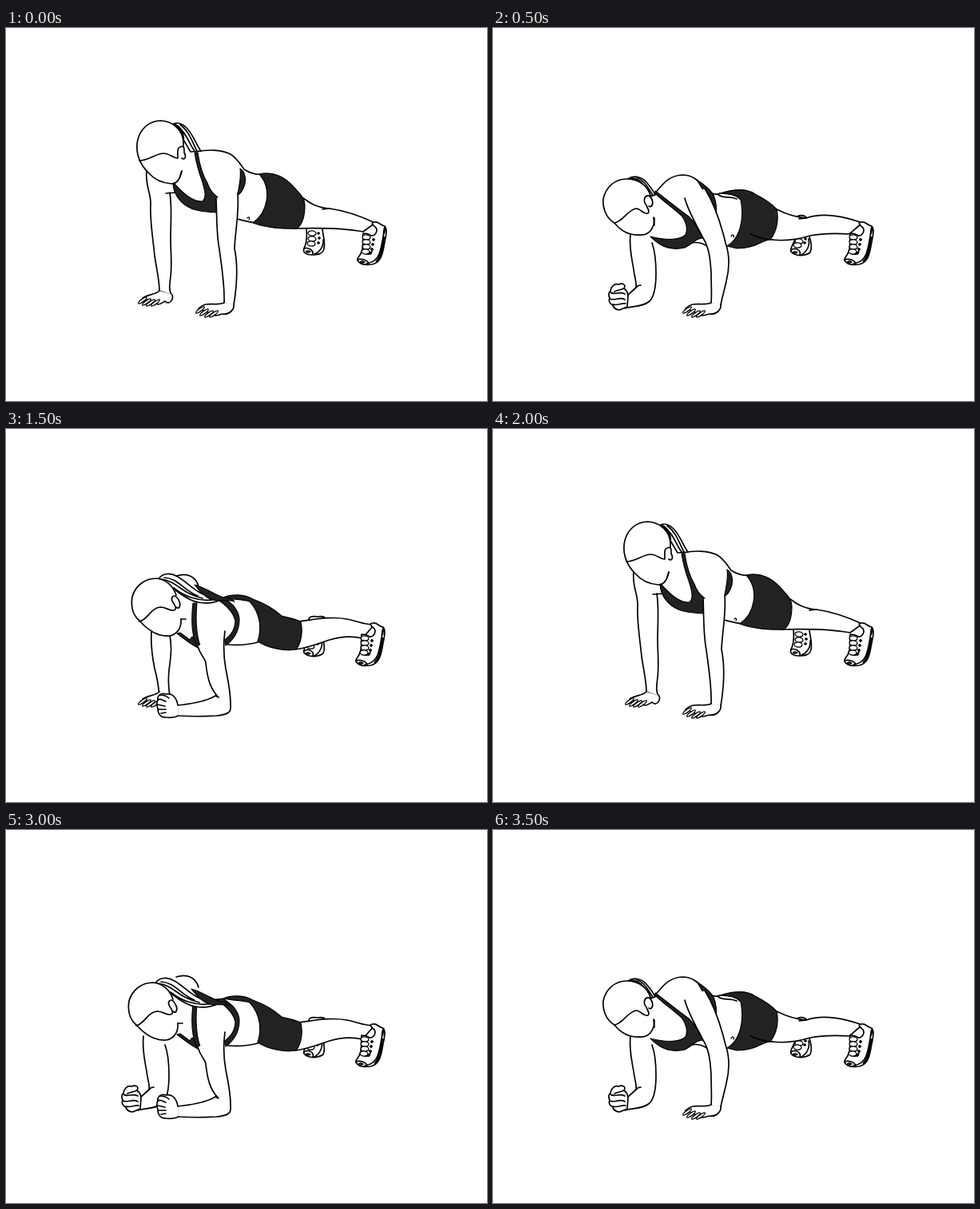
Animation, 602 px wide and 467 px high, one loop 4000 ms. Source, as an HTML page:

```html
<!DOCTYPE html>
<html lang="en">
<head>
<meta charset="utf-8">
<title>Up-down plank</title>
<style>
html, body { margin: 0; width: 100%; height: 100%; overflow: hidden; background: #fff; }
svg { display: block; width: 100%; height: 100%; }
path, ellipse, circle { fill: none; stroke: #000; stroke-width: 1.7; stroke-linecap: round; stroke-linejoin: round; }
.skin { fill: #fff; }
.bare { fill: #fff; stroke: none; }
.cloth { fill: #222; stroke-width: 1.2; }
.dot { fill: #222; stroke-width: 1; }
.thin { stroke-width: 1.3; }
.thick { stroke-width: 2.6; }
.pose { visibility: hidden; animation: 4s step-end infinite; }
#high { animation-name: high; }
#left { animation-name: left; }
#low { animation-name: low; }
#right { animation-name: right; }
@keyframes high { 0%, 50% { visibility: visible; } 12.5%, 62.5%, 100% { visibility: hidden; } }
@keyframes left { 0%, 25% { visibility: hidden; } 12.5%, 87.5%, 100% { visibility: visible; } }
@keyframes low { 0%, 37.5%, 87.5%, 100% { visibility: hidden; } 25%, 75% { visibility: visible; } }
@keyframes right { 0%, 50%, 75%, 100% { visibility: hidden; } 37.5%, 62.5% { visibility: visible; } }
</style>
</head>
<body>
<svg viewBox="0 0 602 467">
<defs>
  <ellipse id="finger" class="skin thin" rx="6.5" ry="1.7" transform="rotate(-36)"/>
  <ellipse id="lace" class="skin thin" rx="5" ry="3.1" transform="rotate(8)"/>

  <g id="shoe">
    <path class="skin" d="M447 257C446 266 448 273 445 280C444 285 439 287 440 291C443 296 451 297 458 296C468 294 471 285 473 273C475 262 478 252 474 248C468 247 467 242 461 243C456 243 459 247 463 250C466 255 461 261 457 260C453 257 450 257 447 257"/>
    <path d="M474 249C472 260 471 272 467 283C464 291 458 294 451 295"/>
    <path class="thick" d="M474 251L473 257M473 262C471 274 470 286 464 292"/>
    <path d="M440 290C445 288 453 291 454 295M446 281C453 285 457 283 458 279"/>
    <use href="#lace" x="451" y="262"/>
    <use href="#lace" x="451" y="268"/>
    <use href="#lace" x="451" y="274"/>
    <use href="#lace" x="450" y="280"/>
    <circle class="dot" cx="460" cy="265" r="1.4"/>
    <circle class="dot" cx="459" cy="271" r="1.4"/>
    <circle class="dot" cx="458" cy="277" r="1.4"/>
    <circle class="dot" cx="456" cy="282" r="1.4"/>
    <ellipse class="dot" cx="446" cy="293" rx="3" ry="1.2"/>
  </g>
  <g id="backShoe">
    <path class="skin" d="M379 262C377 270 371 275 373 280C378 286 390 286 397 281C400 274 398 267 396 261"/>
    <path d="M373 278C379 274 386 279 384 284M395 264C397 272 393 280 386 284"/>
    <use href="#lace" x="383" y="267"/>
    <use href="#lace" x="381" y="272"/>
    <circle class="dot" cx="391" cy="264" r="1.3"/>
    <circle class="dot" cx="390" cy="269" r="1.3"/>
    <ellipse class="dot" cx="378" cy="281" rx="3" ry="1.2"/>
  </g>
  <g id="farHand">
    <path class="skin" d="M192 329C187 334 179 333 171 338L190 346C194 346 197 343 199 342C204 347 210 341 208 334"/>
    <use href="#finger" x="171" y="341"/>
    <use href="#finger" x="176" y="343"/>
    <use href="#finger" x="181" y="344"/>
    <use href="#finger" x="187" y="344"/>
  </g>
  <g id="nearHand">
    <path class="skin" d="M273 344C267 347 258 345 250 346C246 347 243 349 241 351L262 360C266 360 268 358 272 358C279 359 286 353 285 346"/>
    <use href="#finger" x="243" y="353"/>
    <use href="#finger" x="248" y="356"/>
    <use href="#finger" x="254" y="358"/>
    <use href="#finger" x="260" y="358"/>
  </g>

  <!-- far arm resting on the elbow -->
  <g id="farForearm">
    <path class="skin" d="M172 258C170 275 174 290 176 302C177 312 180 318 179 325L168 335L165 351C176 348 188 349 196 342C202 336 204 323 204 307C204 292 203 280 199 269"/>
    <path d="M179 325C181 322 183 322 185 322"/>
    <path class="skin" d="M157 321C152 319 148 324 147 329C144 332 145 336 146 338C144 342 147 346 150 347C151 352 157 354 161 352L168 349L169 336C169 332 168 329 164 326C167 321 162 319 157 321"/>
    <path d="M164 326C160 328 156 328 152 330M147 331C152 335 158 329 165 333M146 339C152 342 159 336 165 340M150 346C156 348 160 344 166 345"/>
  </g>

  <!-- near arm resting on the elbow -->
  <g id="nearForearm">
    <path class="skin" d="M240 272C244 285 250 288 250 293C252 311 255 325 266 336L262 334C251 341 234 344 214 346L215 359C232 360 247 360 263 359C274 358 281 356 281 350C282 333 278 315 275 300C272 283 272 268 274 253"/>
    <path class="skin" d="M215 346C214 338 209 330 200 332C194 330 189 334 190 339C188 343 189 347 190 350C190 357 194 361 200 361C207 362 212 361 216 359"/>
    <path d="M192 333C196 333 201 334 204 337M190 339C194 337 197 340 200 341M190 345L199 347M191 351L200 351M194 356L200 355"/>
  </g>

  <!-- head, ponytail and shoulder strap of the elbow poses -->
  <g id="elbowHead">
    <path class="skin" d="M191 188C195 180 207 180 213 184C224 189 232 200 245 206C255 211 264 212 272 212C264 217 252 219 241 217C228 215 220 207 212 202"/>
    <path d="M198 186C216 187 222 202 240 209M194 188C214 190 219 206 246 212M210 199C222 209 240 216 258 214"/>
    <path class="cloth" d="M236 195C248 198 259 206 272 211C279 211 284 213 286 216C277 213 268 216 258 214C249 211 242 203 236 195"/>
    <path class="skin" d="M219 238C220 250 213 258 204 259C189 260 177 251 168 241C158 233 156 222 158 210C162 196 174 187 188 187C200 188 209 196 213 208"/>
    <path class="skin" d="M167 241C177 239 181 224 193 223C201 223 204 228 210 227C215 226 211 220 209 217C205 211 210 207 213 210C217 214 219 220 217 223C216 225 214 224 213 223"/>
    <path d="M219 238L225 238"/>
  </g>

  <g id="elbowBody">
    <path class="skin" d="M380 242C377 235 382 234 390 235C396 234 400 235 400 239"/>
    <use href="#backShoe"/>
    <path class="skin" d="M365 241C384 239 405 234 427 238C441 241 448 245 461 245L446 262C433 259 418 260 405 264C389 269 378 274 362 276"/>
    <use href="#shoe" x="-2"/>
    <path class="bare" d="M213 184C228 179 238 186 241 197L274 211C290 209 303 214 309 218L317 268C304 271 290 271 278 270L240 272L215 257L225 205"/>
    <path d="M213 184C228 179 238 186 241 197"/>
    <path class="cloth" d="M272 211C283 206 299 207 309 213C323 218 335 225 345 234C355 237 366 238 369 242C372 254 369 269 363 276C346 279 326 273 315 266C320 251 319 231 305 216C296 213 285 214 272 211"/>
    <path class="cloth" d="M214 256C223 263 231 269 240 274L238 264L233 260L230 264L218 255Z"/>
    <path class="cloth" d="M234 218L239 218C237 236 238 258 243 271L239 271C232 258 232 236 234 218"/>
    <path class="cloth" d="M262 212L271 211C280 216 291 225 292 238C292 252 286 263 275 271L274 264C282 258 287 250 287 240C284 228 274 219 262 212"/>
    <path d="M278 270C290 271 304 270 315 267"/>
  </g>
</defs>

<g id="high" class="pose">
  <path class="skin" d="M376 252C377 262 376 270 373 276C371 281 376 284 382 284C390 284 397 283 398 276C400 266 396 258 396 251"/>
  <path d="M373 276C379 274 385 279 384 283M397 265C398 274 392 281 386 283"/>
  <use href="#lace" x="383" y="257"/>
  <use href="#lace" x="383" y="264"/>
  <use href="#lace" x="382" y="270"/>
  <circle class="dot" cx="391" cy="257" r="1.3"/>
  <circle class="dot" cx="392" cy="263" r="1.3"/>
  <circle class="dot" cx="391" cy="269" r="1.3"/>
  <ellipse class="dot" cx="378" cy="280" rx="3" ry="1.2"/>
  <path class="skin" d="M372 213C381 220 390 225 405 226C426 229 445 236 462 244L447 255C425 251 392 250 360 251"/>
  <path d="M405 226L396 227"/>
  <use href="#shoe"/>

  <path class="skin" d="M176 179C174 198 182 207 181 222C180 241 184 264 186 285C189 305 192 316 192 329L208 335C203 329 205 320 206 311C208 295 206 280 206 263C206 244 208 225 205 206"/>
  <use href="#farHand"/>
  <path d="M200 207L213 206"/>
  <path class="bare" d="M208 185L238 155C285 148 295 165 298 177L320 183L334 220L312 244L290 240L250 230L211 206Z"/>
  <path d="M238 155C252 152 269 152 281 158C289 163 293 170 298 177C306 182 314 184 321 183M289 239C297 241 304 243 313 244"/>
  <path class="cloth" d="M317 183C335 179 350 187 360 199C368 208 374 213 374 222C374 235 371 246 364 251C347 252 325 250 309 244C327 231 334 202 317 183"/>
  <path class="thin" d="M302 238C303 236 306 237 304 240"/>
  <path class="cloth" d="M236 156L240 156C242 170 246 184 252 194C255 203 259 207 265 212L264 231C249 230 231 230 219 217C212 210 209 202 209 193C219 204 232 218 246 217C252 211 248 200 245 190C241 180 238 168 236 156"/>
  <path class="cloth" d="M293 176C298 179 301 187 299 195C297 202 294 207 290 209C291 200 295 187 293 176"/>
  <path class="skin" d="M263 213C264 235 263 256 267 277C270 300 274 322 273 345L285 347C289 323 291 300 286 276C287 252 292 232 290 207"/>
  <use href="#nearHand"/>
  <path class="skin" d="M208 121C214 117 221 120 226 125C234 133 238 146 244 154L231 155L221 138"/>
  <path d="M218 121C230 130 234 145 239 154M215 123C226 131 229 145 236 154"/>
  <path class="thick" d="M211 121C217 123 222 131 222 138"/>
  <path class="skin" d="M220 179C218 189 214 195 207 195C194 194 184 188 178 181C167 170 163 158 164 145C166 127 179 116 194 116C208 117 221 126 222 143L222 149"/>
  <path class="skin" d="M167 166C178 166 188 157 197 157C205 157 209 163 215 163C215 155 214 150 218 149C224 146 223 153 223 156C226 161 224 166 220 163"/>
  <path d="M220 179L218 185"/>
</g>

<g id="left" class="pose">
  <path class="skin" d="M379 238C382 233 390 234 393 238"/>
  <use href="#backShoe"/>
  <path class="skin" d="M355 227C367 233 379 237 392 238C414 230 443 237 462 244L446 258C429 257 413 257 397 260C381 265 365 267 348 265"/>
  <path d="M392 238L383 239"/>
  <use href="#shoe"/>
  <use href="#farForearm"/>
  <path class="bare" d="M199 250L204 206C220 180 243 180 258 192L283 208L308 208L314 250L294 274L271 275L248 270L210 272Z"/>
  <path d="M203 206C211 199 217 185 237 184C252 184 258 193 266 201C272 207 278 210 284 207M282 209C290 214 296 210 305 214M248 269C259 267 267 272 271 276"/>
  <path class="cloth" d="M284 207C300 202 317 200 328 208C338 213 349 220 355 227C358 240 355 255 347 265C335 266 329 276 305 276L293 273C309 264 315 239 310 215C302 207 293 208 284 207"/>
  <path d="M322 258C331 262 340 265 350 265"/>
  <path class="thin" d="M298 261C299 258 303 259 301 262"/>
  <path class="cloth" d="M203 204C218 215 232 227 245 236C253 244 258 252 264 263C253 263 249 271 240 275C220 280 207 271 197 261C212 265 232 267 241 259C244 251 242 243 236 235C225 225 212 216 203 207Z"/>
  <path class="cloth" d="M255 190C264 196 275 204 277 212C280 220 280 229 279 238C274 222 264 204 255 190"/>
  <path class="skin" d="M240 213C244 229 256 249 263 263C271 276 272 291 273 306C273 321 274 333 273 345L285 347C287 336 290 327 292 317C296 301 297 286 291 269C285 244 277 220 265 201"/>
  <use href="#nearHand"/>
  <path class="skin" d="M169 189C176 184 186 186 192 193C197 199 201 204 203 209L197 211"/>
  <path d="M173 188C186 188 190 200 198 210M179 187C190 190 194 201 200 209"/>
  <path class="thick" d="M171 189C181 189 187 195 190 201"/>
  <path class="skin" d="M202 238C202 251 195 260 184 259C171 260 160 254 152 244C140 237 137 223 138 214C141 199 153 189 167 189C183 189 194 198 197 210"/>
  <path class="skin" d="M152 244C162 243 168 228 179 226C185 226 188 234 194 232C197 229 193 226 192 222C187 216 190 209 195 210C199 212 201 219 199 222C198 224 196 224 195 223"/>
  <path d="M201 237L202 247"/>
</g>

<g id="low" class="pose">
  <use href="#farForearm"/>
  <use href="#elbowBody"/>
  <use href="#nearForearm"/>
  <use href="#elbowHead" x="-4" y="4"/>
</g>

<g id="right" class="pose">
  <path class="skin" d="M182 254C181 270 183 285 186 300C190 314 191 323 192 334L205 334C203 323 203 313 204 302C206 287 208 275 205 258"/>
  <use href="#farHand"/>
  <use href="#elbowBody"/>
  <use href="#nearForearm"/>
  <use href="#elbowHead"/>
</g>
</svg>
</body>
</html>
```
